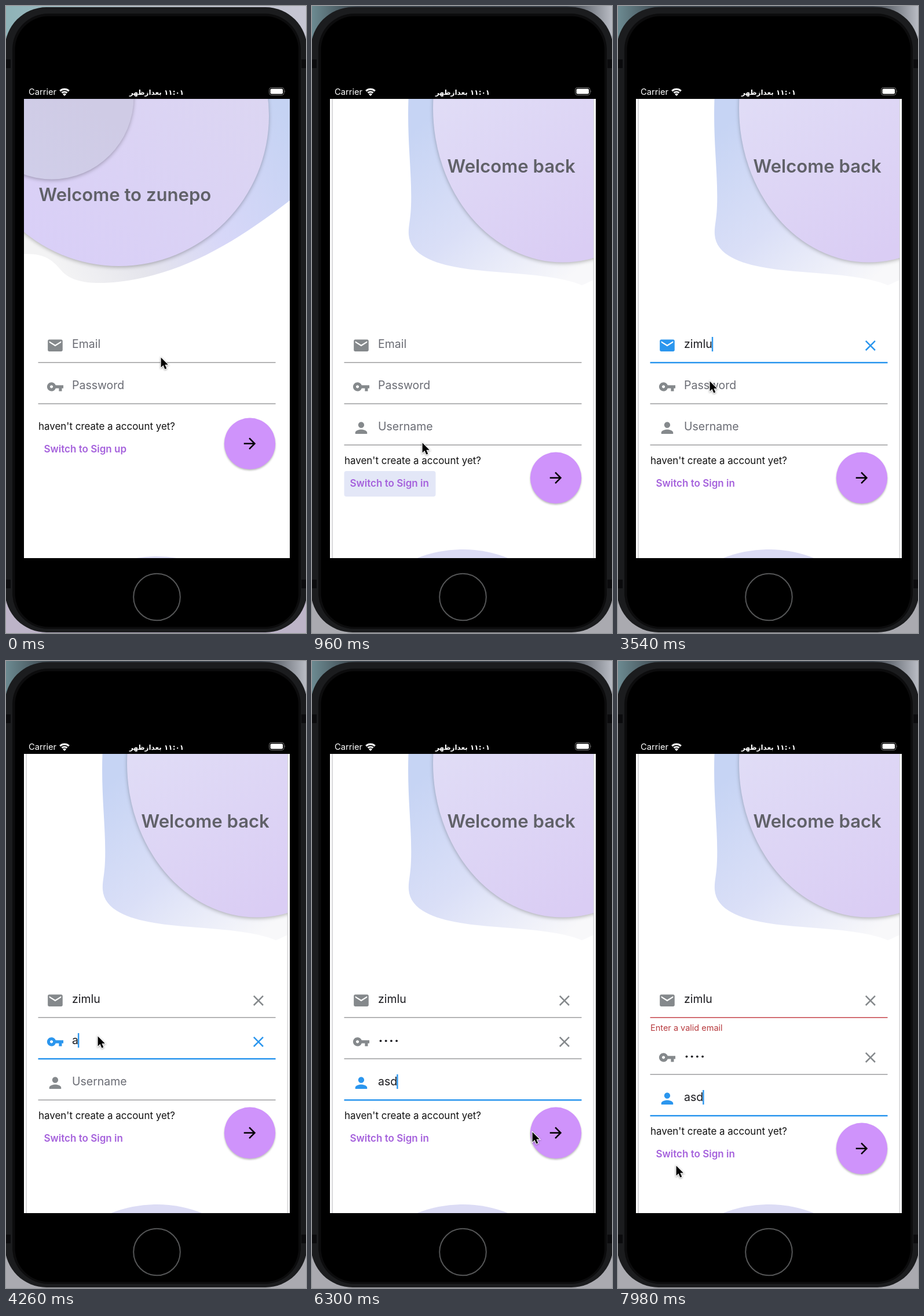
Animation of 518 by 1080 pixels, one loop 8000 ms. Source, as an HTML page:

```html
<!DOCTYPE html>
<html lang="en">
<head>
<meta charset="utf-8">
<style>
html, body { margin: 0; width: 100%; height: 100%; overflow: hidden; background: #000; }
svg { display: block; width: 518px; height: 1080px; font-family: Inter, sans-serif; }
.title { font-size: 31.1px; font-weight: 600; fill: #606168; }
.input { font-size: 19.5px; }
.shade { filter: drop-shadow(0 2px 3px #0004); }
</style>
</head>
<body>
<svg viewBox="0 0 518 1080">
  <defs>
    <clipPath id="screen"><path d="M31 160H490V951H31z"/></clipPath>
    <linearGradient id="deskTop"><stop stop-color="#8fb3b8"/><stop offset=".5" stop-color="#b5bdc6"/><stop offset="1" stop-color="#c6c6d3"/></linearGradient>
    <linearGradient id="deskTopDim"><stop stop-color="#6c8a91"/><stop offset=".15" stop-color="#3a424a"/><stop offset=".85" stop-color="#3c434b"/><stop offset="1" stop-color="#b9bcc4"/></linearGradient>
    <linearGradient id="waveA" gradientUnits="userSpaceOnUse" x1="490" y1="200" x2="100" y2="460">
      <stop stop-color="#c5d3f3"/><stop offset=".45" stop-color="#d7d7f8"/><stop offset=".75" stop-color="#e5e5ec"/><stop offset="1" stop-color="#f3f3f4"/>
    </linearGradient>
    <linearGradient id="diskA" x1=".8" y1=".3" x2=".3" y2="1"><stop stop-color="#dcd6f2"/><stop offset="1" stop-color="#d9cff7"/></linearGradient>
    <linearGradient id="smallA" x1=".7" y1=".5" x2=".3" y2="1"><stop stop-color="#cfcbe5"/><stop offset="1" stop-color="#d0cee9"/></linearGradient>
    <linearGradient id="waveB" gradientUnits="userSpaceOnUse" x1="190" y1="200" x2="430" y2="480">
      <stop stop-color="#c6d4f4"/><stop offset=".5" stop-color="#dadff7"/><stop offset="1" stop-color="#f8f8fa"/>
    </linearGradient>
    <linearGradient id="diskB" x1=".2" y1=".4" x2=".5" y2="1"><stop stop-color="#e0dcf6"/><stop offset="1" stop-color="#dacdf4"/></linearGradient>
  </defs>

  <path d="M0 0H518V540H0z" fill="url(#deskTop)"/>
  <path d="M0 540H518V1080H0z" fill="#bdb4c8"/>
  <g id="deskDim">
    <path d="M0 0H518V540H0z" fill="url(#deskTopDim)"/>
    <path d="M0 540H518V1080H0z" fill="#aaaab0"/>
  </g>
  <rect x="-2" y="2" width="522" height="1077" rx="72" fill="#1b1c1e"/>
  <path d="M0 92H8V107H0zM510 92H518V107H510zM0 988H8V1003H0zM510 988H518V1003H510z" fill="#0b0b0d"/>
  <rect x="11" y="13" width="498" height="1060" rx="62" fill="#0c0c0d"/>
  <rect x="15.5" y="17.5" width="489.5" height="1052" rx="58"/>
  <circle cx="260.5" cy="1018" r="40.3" fill="none" stroke="#555657" stroke-width="2"/>

  <g fill="#fff">
    <text x="39" y="153.2" font-size="14.7">Carrier</text>
    <path d="M93.2 146.3a11.6 11.6 0 0 1 15.6 0M96.5 149.6a7 7 0 0 1 9 0" fill="none" stroke="#fff" stroke-width="3"/>
    <path d="M101 155l-3-3.1a4.4 4.4 0 0 1 6 0z"/>
    <text x="260" y="153" font-size="12" font-weight="700" text-anchor="middle" direction="rtl" style="font-family:'DejaVu Sans',sans-serif">۱۱:۰۱ بعدازظهر</text>
    <rect x="454.5" y="140.5" width="25.5" height="13" rx="3.8" fill="none" stroke="#777"/>
    <rect x="456.5" y="142.5" width="21.5" height="9" rx="2"/>
    <path d="M481.3 145q1.8 2 0 4z" fill="#777"/>
  </g>

  <g clip-path="url(#screen)">
    <path d="M31 160H490V951H31z" fill="#fff"/>
    <g id="signIn">
      <path d="M31 427C66 426 80 437 95 455C113 477 150 480 195 475C305 462 395 408 490 335V160H31z" fill="url(#waveA)"/>
      <circle class="shade" cx="195" cy="189" r="259" fill="url(#diskA)"/>
      <circle class="shade" cx="79" cy="157" r="141.5" fill="url(#smallA)"/>
      <text class="title" x="56.5" y="336">Welcome to zunepo</text>
    </g>
    <g id="signUp">
      <path d="M166.5 160C164 235 173 290 171 345C170 370 166 380 167 394C171 447 265 454 330 459C400 464 440 470 466 481L486 472V160z" fill="url(#waveB)"/>
      <path d="M35 160V951M486.5 160V951" stroke="#d9d9db" stroke-width="2"/>
      <svg x="31" y="160" width="455" height="330" viewBox="31 160 455 330">
        <ellipse class="shade" cx="433" cy="176" rx="224" ry="265.5" fill="url(#diskB)"/>
      </svg>
      <text class="title" x="233.5" y="287">Welcome back</text>
    </g>
    <circle id="bottomDisk" cx="260" r="212" fill="#dcdcf5"/>
    <text id="error" x="56" y="637" font-size="14.5" fill="#b73a3e">Enter a valid email</text>
    <g id="fields"></g>
    <g id="footer">
      <text x="56" y="729.7" font-size="16.95" fill="#111">haven't create a account yet?</text>
      <rect id="press" x="55.5" y="742" width="158" height="44" rx="4" fill="#e3e7f7"/>
      <text id="switch" x="65.5" y="769.3" font-size="17" font-weight="600" fill="#a561dc"></text>
      <circle cx="421" cy="753.8" r="44.2" fill="#cf93fb" style="filter:drop-shadow(0 2px 1.5px #0004)"/>
      <path transform="translate(405.6 738.4) scale(1.28)" d="M12 4l-1.41 1.41L16.17 11H4v2h12.17l-5.58 5.59L12 20l8-8z"/>
    </g>
  </g>
  <path id="pointer" d="M0 0V18.7l4.3-4 3.2 7.3 3.3-1.4-3.2-7.1h6z" stroke="#fff" stroke-width="2.4" paint-order="stroke" style="filter:drop-shadow(0 1px 1.5px #0006)"/>
</svg>

<script>
const $ = id => document.getElementById(id);
const set = (el, attrs) => { for (const k in attrs) el.setAttribute(k, attrs[k]); };
const make = (parent, tag, attrs) => {
  const el = document.createElementNS('http://www.w3.org/2000/svg', tag);
  set(el, attrs);
  return parent.appendChild(el);
};
const ease = (t, from, to) => {
  const u = Math.min(1, Math.max(0, (t - from) / (to - from)));
  return u * u * (3 - 2 * u);
};

const LOOP = 8000, SWITCH = 620, ERROR = 6600;
const GREY = '#85898c', BLUE = '#2b96ee', RED = '#c54248';
const CLOSE = 'M19 6.41L17.59 5 12 10.59 6.41 5 5 6.41 10.59 12 5 17.59 6.41 19 12 13.41 17.59 19 19 17.59 13.41 12z';

const fields = [
  { label: 'Email', value: 'zimlu', focus: 1800, blur: 3660, keys: [2820, 2930, 3040, 3150, 3260],
    icon: 'M20 4H4c-1.1 0-2 .9-2 2v12c0 1.1.9 2 2 2h16c1.1 0 2-.9 2-2V6c0-1.1-.9-2-2-2zm0 4l-8 5-8-5V6l8 5 8-5z' },
  { label: 'Password', value: 'asdf', secret: true, focus: 3660, blur: 5280, keys: [4020, 4320, 4680, 5000],
    icon: 'M12.65 10C11.83 7.67 9.61 6 7 6c-3.31 0-6 2.69-6 6s2.69 6 6 6c2.61 0 4.83-1.67 5.65-4H17v4h4v-4h2v-4zM7 14c-1.1 0-2-.9-2-2s.9-2 2-2 2 .9 2 2-.9 2-2 2z' },
  { label: 'Username', value: 'asd', focus: 5280, blur: LOOP, keys: [5520, 5740, 5940], noClear: true,
    icon: 'M12 12c2.21 0 4-1.79 4-4s-1.79-4-4-4-4 1.79-4 4 1.79 4 4 4zm0 2c-2.67 0-8 1.34-8 4v2h16v-2c0-2.66-5.33-4-8-4z' }
];

for (const f of fields) {
  f.group = make($('fields'), 'g', {});
  f.iconEl = make(f.group, 'path', { d: f.icon, transform: 'translate(69.6 569.5) scale(1.28)' });
  f.text = make(f.group, 'text', { class: 'input', y: 588.8 });
  f.dots = f.secret ? [...f.value].map((_, i) =>
    make(f.group, 'circle', { cx: 118.5 + 9.2 * i, cy: 583.3, r: 1.9, fill: '#1c1c20' })) : [];
  f.clear = make(f.group, 'path', { d: CLOSE, transform: 'translate(420.5 569.6) scale(1.28)' });
  f.line = make(f.group, 'path', { d: 'M55.5 614.2H465.5' });
  f.caret = make(f.group, 'rect', { y: 570, width: 2.4, height: 25, fill: BLUE });
}

function drawField(f, i, t, appear, error) {
  const active = t >= f.focus && t < f.blur;
  const count = f.keys.filter(k => t >= k).length;
  const lastKey = count ? f.keys[count - 1] : f.focus;
  const color = active ? BLUE : GREY;
  const invalid = i === 0 && error > 0;
  let x = 114, shown = count ? f.value.slice(0, count) : f.label;

  if (f.secret && count) {
    const reveal = active && t - lastKey < 400;
    const hidden = count - reveal;
    f.dots.forEach((dot, n) => set(dot, { opacity: +(n < hidden) }));
    x = 114 + 9.2 * hidden;
    shown = reveal ? f.value[count - 1] : '';
  } else {
    f.dots.forEach(dot => set(dot, { opacity: 0 }));
  }
  f.text.textContent = shown;
  set(f.text, { x, fill: count ? '#1c1c20' : '#6a6c74' });
  const end = x - 1 + (count && f.text.getComputedTextLength());
  const blink = Math.floor((t - lastKey) / 500) % 2 === 0;
  set(f.caret, { x: end, opacity: +(active && blink) });
  set(f.iconEl, { fill: color });
  set(f.clear, { fill: color, opacity: +(count > 0 && !f.noClear) });
  set(f.line, {
    stroke: invalid ? RED : active ? BLUE : '#88898b',
    'stroke-width': invalid ? 1.6 : active ? 2.45 : 1.22
  });
  set(f.group, {
    transform: `translate(0 ${71 * i + (i ? 27 * error : 0)})`,
    opacity: i === 2 ? appear : 1
  });
}

// Pointer stops: time, x, y
const stops = [
  [0, 267, 605], [60, 267, 605], [120, 266, 596], [300, 266, 596], [580, 190, 752],
  [1140, 190, 752], [1700, 185, 575], [3040, 185, 575], [3500, 158, 646], [4600, 158, 646],
  [5060, 145, 749], [5800, 145, 749], [6280, 380, 811], [6340, 380, 811], [6480, 405, 815],
  [6700, 405, 815], [7600, 100, 869], [LOOP, 100, 869]
];

function drawPointer(t) {
  const n = stops.findIndex(s => s[0] > t);
  const [t0, x0, y0] = stops[n - 1], [t1, x1, y1] = stops[n];
  const u = ease(t, t0, t1);
  const x = x0 + (x1 - x0) * u, y = y0 + (y1 - y0) * u;
  set($('pointer'), { transform: `translate(${x + 0.6} ${y + 0.6}) scale(.9)` });
}

function draw(t) {
  const p = ease(t, SWITCH, SWITCH + 300);
  const error = ease(t, ERROR, ERROR + 170);
  set($('deskDim'), { opacity: p });
  set($('signIn'), { opacity: 1 - p });
  set($('signUp'), { opacity: p });
  set($('bottomDisk'), { cy: 1160 - 12 * p });
  set($('error'), { opacity: error });
  set($('footer'), { transform: `translate(0 ${59 * p + 27 * error})` });
  set($('press'), { opacity: ease(t, SWITCH - 60, SWITCH + 60) * (1 - ease(t, 1020, 1260)) });
  $('switch').textContent = 'Switch to Sign ' + (t < SWITCH ? 'up' : 'in');
  fields.forEach((f, i) => drawField(f, i, t, p, error));
  drawPointer(t);
}

const start = performance.now();
function tick() {
  draw((performance.now() - start) % LOOP);
  requestAnimationFrame(tick);
}
tick();
</script>
</body>
</html>
```
